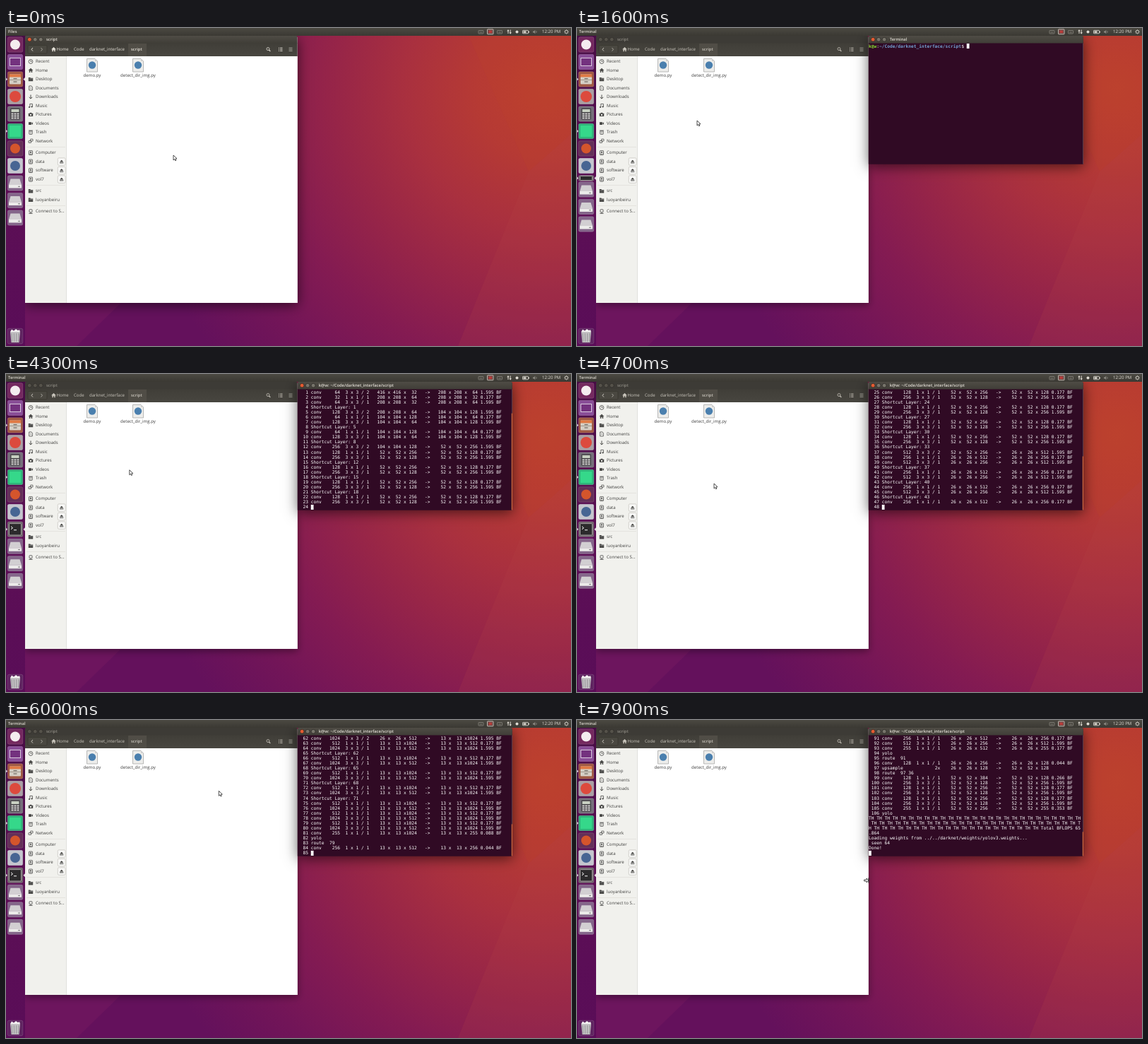
An HTML page with a canvas for the animation above (8000 ms loop, 800x450 px).

```html
<!DOCTYPE html>
<html lang="en">
<head>
<meta charset="utf-8">
<title>Desktop session</title>
<style>
html, body { margin: 0; width: 100%; height: 100%; overflow: hidden; background: #8b1b55; }
canvas { display: block; width: 100vw; height: 100vh; }
</style>
</head>
<body>
<canvas id="stage" width="800" height="450"></canvas>
<script>
const ctx = document.getElementById('stage').getContext('2d');
ctx.textRendering = 'geometricPrecision';

const LOOP = 8000, STEP = 100;
const UI = '"Open Sans", "Noto Sans", sans-serif';
const MONO = '"DejaVu Sans Mono", monospace';
const CELL_W = 3.75, CELL_H = 17 / 2.4, COLS = 80, ROWS = 24;
const TERM = { x: 413, y: 22 };
const CWD = '~/Code/darknet_interface/script';
const USER = 'k@w';
const PROMPT = USER + ':' + CWD + '$ ';
const EXPORT = 'export LD_LIBRARY_PATH=../lib:$LD_LIBRARY_PATH';
const RUN = 'python demo.py webcam ../../darknet/cfg/yolov3.cfg ../../darknet/weights/yolov3.weights 0.5 1';

// ---------- drawing helpers ----------
function rect(x, y, w, h, fill) {
  ctx.fillStyle = fill;
  ctx.fillRect(x, y, w, h);
}
function round(x, y, w, h, r, fill, stroke) {
  ctx.beginPath();
  ctx.roundRect(x, y, w, h, r);
  paint(fill, stroke);
}
function circle(x, y, r, fill, stroke) {
  ctx.beginPath();
  ctx.arc(x, y, r, 0, 7);
  paint(fill, stroke);
}
function trace(pts) {
  ctx.beginPath();
  for (let i = 0; i < pts.length; i += 2) ctx.lineTo(pts[i], pts[i + 1]);
}
function poly(pts, fill, stroke) {
  trace(pts);
  ctx.closePath();
  paint(fill, stroke);
}
function line(pts, color, width = 0.8) {
  trace(pts);
  ctx.lineWidth = width;
  ctx.strokeStyle = color;
  ctx.stroke();
}
function paint(fill, stroke) {
  if (fill) { ctx.fillStyle = fill; ctx.fill(); }
  if (stroke) { ctx.lineWidth = 0.8; ctx.strokeStyle = stroke; ctx.stroke(); }
}
function text(s, x, y, color, bold = false, align = 'left') {
  ctx.font = (bold ? '600 5.8px ' : '6.1px ') + UI;
  ctx.textAlign = align;
  ctx.textBaseline = 'middle';
  ctx.fillStyle = color;
  ctx.fillText(s, x, y);
}
function stops(g, colors) {
  colors.forEach((c, i) => g.addColorStop(i / (colors.length - 1), c));
  return g;
}
const fade = (x0, y0, x1, y1, ...colors) => stops(ctx.createLinearGradient(x0, y0, x1, y1), colors);
const glow = (x, y, r, ...colors) => stops(ctx.createRadialGradient(x, y, 0, x, y, r), colors);

function shadowed(blur, alpha, draw) {
  ctx.save();
  ctx.shadowColor = `rgba(0,0,0,${alpha})`;
  ctx.shadowBlur = blur;
  ctx.shadowOffsetY = 3;
  draw();
  ctx.restore();
}
// Linear interpolation through [time, ...values] keys
function track(keys, t) {
  if (t <= keys[0][0]) return keys[0].slice(1);
  for (let i = 1; i < keys.length; i++) {
    const [a, b] = [keys[i - 1], keys[i]];
    if (t <= b[0]) {
      const k = (t - a[0]) / (b[0] - a[0]);
      return a.slice(1).map((v, j) => v + (b[j + 1] - v) * k);
    }
  }
  return keys[keys.length - 1].slice(1);
}

// ---------- network listing ----------
function buildLayers() {
  const out = [], shapes = [];
  let w = 416, c = 3;
  const pad = (v, n) => String(v).padStart(n);
  const dims = (s, ch) => `${pad(s, 4)} x${pad(s, 4)} x${pad(ch, 4)}`;
  const add = s => { out.push(pad(out.length, 4) + ' ' + s); shapes.push([w, c]); };
  const conv = (n, size, stride = 1) => {
    const o = w / stride;
    const bf = (2 * n * size * size * c * o * o / 1e9).toFixed(3);
    const s = `conv  ${pad(n, 5)} ${pad(size, 2)} x${pad(size, 2)} /${pad(stride, 2)}  ${dims(w, c)}   ->  ${dims(o, n)} ${bf} BF`;
    w = o; c = n;
    add(s);
  };
  const route = (...ids) => {
    w = shapes[ids[0]][0];
    c = ids.reduce((sum, i) => sum + shapes[i][1], 0);
    add('route  ' + ids.join(' '));
  };
  const head = n => {
    for (let i = 0; i < 3; i++) { conv(n, 1); conv(2 * n, 3); }
    conv(255, 1);
    add('yolo');
  };
  const upsample = () => {
    const s = `upsample            2x  ${dims(w, c)}   ->  ${dims(2 * w, c)}`;
    w *= 2;
    add(s);
  };

  conv(32, 3);
  [1, 2, 8, 8, 4].forEach((repeat, i) => {
    const n = 64 << i;
    conv(n, 3, 2);
    for (let k = 0; k < repeat; k++) {
      conv(n / 2, 1);
      conv(n, 3);
      add('Shortcut Layer: ' + (out.length - 3));
    }
  });
  head(512);
  route(79); conv(256, 1); upsample(); route(85, 61);
  head(256);
  route(91); conv(128, 1); upsample(); route(97, 36);
  head(128);
  return out;
}
const LAYERS = buildLayers();

const PROGRESS = [[3900, 0], [4700, 48], [5300, 66], [6600, 102], [6800, 107]];

function wrap(s) {
  const rows = [];
  for (let i = 0; i < s.length; i += COLS) rows.push(s.slice(i, i + COLS));
  return rows;
}
function typed(s, t, from, to) {
  return s.slice(0, Math.ceil(s.length * Math.min(1, Math.max(0, (t - from) / (to - from)))));
}
// Terminal rows at time t; the caret follows the last row
function screen(t) {
  const first = wrap(PROMPT + typed(EXPORT, t, 1800, 2600));
  if (t < 2700) return first;
  const rows = [...first, ...wrap(PROMPT + typed(RUN, t, 2700, 3200))];
  if (t < 3300) return rows;
  rows.push('layer     filters    size              input                output');
  const n = Math.floor(track(PROGRESS, t)[0] + 1e-6);
  rows.push(...LAYERS.slice(0, n));
  if (n < LAYERS.length) return [...rows, LAYERS[n].slice(0, 5)];
  rows.push(...wrap('TH '.repeat(75) + 'Total BFLOPS 65.864'));
  rows.push('Loading weights from ../../darknet/weights/yolov3.weights...');
  if (t >= 7300) rows.push(' seen 64', 'Done!');
  return [...rows, ''];
}

// ---------- desktop ----------
function wallpaper() {
  rect(0, 0, 800, 450, glow(765, 85, 600, '#bc402f', '#b63a34', '#a9303f', '#972548', '#841b52', '#721558', '#64115c'));
  poly([655, 11, 800, 11, 800, 150, 740, 203], 'rgba(190,66,42,.18)');
  poly([740, 203, 800, 150, 800, 450, 640, 450], 'rgba(180,72,72,.16)');
  poly([27, 380, 172, 380, 100, 450, 27, 450], 'rgba(150,40,104,.18)');
}

function panel(t) {
  rect(0, 0, 800, 11, fade(0, 0, 0, 11, '#4b4942', '#3b3933'));
  const ink = '#e0dcd3', dim = '#8b8880';
  const showMenu = t >= 1900 && t < 4000;
  ctx.save();
  ctx.beginPath();
  ctx.rect(0, 0, showMenu ? 27 : 100, 11);
  ctx.clip();
  text(t < 1600 ? 'Files' : 'Terminal', 3, 5.3, ink, true);
  ctx.restore();
  if (showMenu) {
    const items = { 30: 'Terminal', 59: 'File', 75: 'Edit', 91: 'View', 110: 'Search', 135: 'Terminal', 164: 'Help' };
    for (const x in items) text(items[x], +x, 5.3, ink);
  }
  for (const x of [669, 695.5]) {
    round(x, 3.5, 7, 4.5, 0.6, null, dim);
    line([x + 1.5, 6, x + 5.5, 6], dim);
  }
  round(681.5, 1.8, 8.5, 7, 0.6, '#6d4a47', '#d9d2ca');
  rect(683.5, 3.6, 4.5, 3.4, '#b93c3a');
  line([711, 8, 711, 3], ink, 1);
  poly([709.3, 4.5, 711, 2, 712.7, 4.5], ink);
  line([714.2, 2.5, 714.2, 7.5], ink, 1);
  poly([712.5, 6.3, 714.2, 8.8, 715.9, 6.3], ink);
  circle(723.5, 5.5, 2, ink);
  round(731.5, 3.4, 8, 4.4, 0.6, null, ink);
  rect(732.5, 4.4, 4, 2.4, ink);
  rect(740, 4.7, 1, 1.8, ink);
  poly([746, 4.4, 747.5, 4.4, 749.3, 2.8, 749.3, 8.2, 747.5, 6.6, 746, 6.6], dim);
  line([751, 4, 751, 7], dim);
  text('12:20 PM', 759, 5.3, ink);
  circle(793.5, 5.4, 2, null, ink);
  for (let a = 0; a < 8; a++) {
    const cx = Math.cos(a * Math.PI / 4), cy = Math.sin(a * Math.PI / 4);
    line([793.5 + cx * 2.2, 5.4 + cy * 2.2, 793.5 + cx * 3.2, 5.4 + cy * 3.2], ink);
  }
}

function tile(y, fill, h = 21.5) {
  round(2.3, y - h / 2, 21.5, h, 2, fill, 'rgba(255,255,255,.18)');
}
function drive(y) {
  tile(y, '#84668a');
  poly([6.5, y - 6, 19.5, y - 6, 22, y + 2.5, 4, y + 2.5], '#d2cfd2');
  rect(4, y + 2.5, 18, 4.5, '#ecebea');
  rect(17, y + 4.3, 3, 1, '#777');
}
function launcher(t) {
  rect(0, 11, 27, 439, fade(0, 11, 0, 450, '#480c45', '#5c0f55', '#5a0d58'));
  const y = i => 23.5 + i * 24.5;
  tile(y(0), '#74295f');
  circle(13, y(0), 7, '#f4ecef');
  tile(y(1), '#8a4f98');
  rect(5, y(1) - 6, 16, 12, '#d8c8dc');
  rect(6, y(1) - 5, 14, 10, '#74327f');
  tile(y(2), '#a05a43');
  round(5, y(2) - 7, 16, 14, 1, '#d6d0c6');
  rect(5, y(2) - 7, 16, 4, '#e07a45');
  line([5, y(2) + 1, 21, y(2) + 1], '#8f887e');
  rect(10.5, y(2) - 1.5, 5, 1.2, '#6d665e');
  rect(10.5, y(2) + 3, 5, 1.2, '#6d665e');
  tile(y(3), '#aaa0a4');
  circle(13, y(3), 8, '#dc4a3d');
  tile(y(4), '#75707a');
  round(6, y(4) - 8, 14, 16, 1, '#474549');
  rect(7.5, y(4) - 6.5, 11, 4, '#c8d0c2');
  for (let i = 0; i < 9; i++) rect(7.5 + i % 3 * 4, y(4) - 1 + (i / 3 | 0) * 3, 3, 2, '#d6d4d4');
  tile(y(5), '#2fb67a');
  rect(5, y(5) - 8, 16, 16, '#35d88a');
  tile(y(6), '#643058');
  circle(13, y(6), 7, '#d4552c');
  tile(y(7), '#c4c6ce');
  circle(13, y(7), 7, '#476593');

  const open = t >= 1600;
  const shift = !open ? 0 : t < 1700 ? 9 : 24.3;
  for (let i = 8; i < 11; i++) drive(y(i) + shift);
  const ty = t < 1700 ? 212.5 : 219.8;
  if (open) {
    const h = t < 1700 ? 8 : 21.5;
    tile(ty, '#6c6569', h);
    round(4.5, ty - h * 0.38, 17, h * 0.76, 1, '#2c2a2c', '#bab5b5');
    if (t >= 1700) {
      line([7, ty - 4, 9.5, ty - 2, 7, ty], '#fff', 1);
      line([11, ty + 1, 15, ty + 1], '#fff', 1);
    }
  }
  for (let k = 0; k < 3; k++) {
    const py = [y(2), y(5), ty][k];
    if (k < 2 || open) poly([0, py - 2, 2, py, 0, py + 2], '#e7dde5');
  }
  const active = open ? ty : y(2);
  poly([27, active - 2.5, 24.5, active, 27, active + 2.5], '#e7dde5');

  tile(436, '#5f2560');
  poly([6, 430, 20, 430, 18.5, 445, 7.5, 445], '#c4c2c4');
  for (let i = 0; i < 4; i++) line([8 + i * 3.3, 432, 8.7 + i * 2.9, 444], '#827e85', 0.7);
  poly([6, 430, 8, 426.5, 11, 428.5, 14, 426, 17, 428, 19, 427, 20, 430], '#f4f2f2');
}

// ---------- file manager ----------
const ICONS = {
  clock(x, y, c) { circle(x, y, 2.9, null, c); line([x, y - 1.8, x, y, x + 1.5, y], c); },
  home(x, y, c) { poly([x - 3.4, y, x, y - 3.2, x + 3.4, y, x + 2.2, y, x + 2.2, y + 3, x + 0.7, y + 3, x + 0.7, y + 1, x - 0.7, y + 1, x - 0.7, y + 3, x - 2.2, y + 3, x - 2.2, y], c); },
  folder(x, y, c) { poly([x - 3.2, y - 2.6, x - 0.6, y - 2.6, x, y - 1.7, x + 3.2, y - 1.7, x + 3.2, y + 2.7, x - 3.2, y + 2.7], c); line([x - 2.5, y - 0.6, x + 2.8, y - 0.6], '#aaa', 0.5); },
  doc(x, y, c) { poly([x - 2.3, y - 3, x + 1, y - 3, x + 2.3, y - 1.6, x + 2.3, y + 3, x - 2.3, y + 3], null, c); line([x - 1, y, x + 1, y], c, 0.6); },
  down(x, y, c) { line([x, y - 3, x, y + 2.5], c, 1); line([x - 2.3, y + 0.3, x, y + 2.6, x + 2.3, y + 0.3], c, 1); },
  note(x, y, c) { line([x - 1.2, y + 2, x - 1.2, y - 2.6, x + 2.4, y - 2.6, x + 2.4, y + 1.2], c); circle(x - 2, y + 2, 1.1, c); circle(x + 1.6, y + 1.4, 1.1, c); },
  camera(x, y, c) { round(x - 3.2, y - 1.8, 6.4, 4.4, 0.6, c); rect(x - 1.3, y - 2.7, 2.6, 1.2, c); circle(x, y + 0.4, 1.2, '#ecece8'); },
  video(x, y, c) { rect(x - 3, y - 1.8, 4, 3.8, c); poly([x + 1, y, x + 3, y - 1.8, x + 3, y + 2], c); },
  trash(x, y, c) { round(x - 2.2, y - 1.7, 4.4, 4.6, 0.5, null, c); line([x - 3, y - 2.4, x + 3, y - 2.4], c); line([x, y - 1, x, y + 2], c, 0.6); },
  net(x, y, c) { round(x - 3, y - 0.4, 3.6, 2.8, 0.3, null, c); round(x - 0.4, y - 2.8, 3.4, 2.8, 0.3, null, c); },
  disk(x, y, c) { round(x - 2.5, y - 3, 5, 6, 0.6, null, c); circle(x, y - 0.7, 1.1, c); line([x - 1.5, y + 1.7, x + 1.5, y + 1.7], c); },
  server(x, y, c) { round(x - 2, y - 3, 4, 4, 0.5, null, c); line([x - 2.6, y + 2.7, x + 2.6, y + 2.7], c); line([x, y + 1, x, y + 2.6], c); }
};
const PLACES = [
  'clock Recent', 'home Home', 'folder Desktop', 'doc Documents', 'down Downloads', 'note Music',
  'camera Pictures', 'video Videos', 'trash Trash', 'net Network', '',
  'disk Computer', 'disk data', 'disk software', 'disk vol7', '',
  'folder src', 'folder luoyanbeiru', '', 'server Connect to S...'
];

function titleBar(x, w, title, focused) {
  ctx.beginPath();
  ctx.roundRect(x, 11, w, 11, [2, 2, 0, 0]);
  paint(focused ? fade(0, 11, 0, 22, '#4f4c45', '#3f3d37') : '#3d3b36');
  for (let i = 0; i < 3; i++) {
    const fill = !focused ? '#55524a' : i ? '#77746a' : '#e55b32';
    circle(x + 6.3 + i * 8, 16.2, 2.9, fill, '#2f2d29');
  }
  text(title, x + 30, 16.2, focused ? '#e2ded5' : '#8d8a82', true);
}
function pyFile(x, name) {
  poly([x - 7.5, 43.5, x + 4, 43.5, x + 7.5, 47, x + 7.5, 62, x - 7.5, 62], '#ededeb', '#a9a9a7');
  poly([x + 4, 43.5, x + 4, 47, x + 7.5, 47], '#cfcfcd');
  circle(x, 52.5, 5.2, '#4a7fae');
  text(name, x, 67, '#3c3c3c', false, 'center');
}
function files(focused) {
  shadowed(focused ? 17 : 10, focused ? 0.6 : 0.4, () => rect(27, 13, 385.6, 376, '#fff'));
  titleBar(27, 385.6, 'script', focused);
  rect(27, 21.5, 385.6, 18.5, fade(0, 21, 0, 40, '#403e38', '#484640'));
  const ink = focused ? '#e4e0d7' : '#c9c5bc';
  round(31, 24.5, 27, 11.5, 1.5, '#4a4841', '#38362f');
  line([38, 28, 36, 30.3, 38, 32.6], ink, 1);
  line([49.5, 28, 51.5, 30.3, 49.5, 32.6], '#a9a69e', 1);
  rect(173, 22, 26, 18, '#504d46');
  ICONS.home(67.5, 30.3, ink);
  text('Home', 71.5, 30.5, ink);
  text('Code', 96, 30.5, ink);
  text('darknet_interface', 118, 30.5, ink);
  text('script', 177, 30.5, ink, true);
  circle(371, 29.6, 2, null, ink);
  line([372.4, 31, 374.3, 33], ink, 1.1);
  for (let i = 0; i < 3; i++) {
    const y = 28.2 + i * 2.1;
    rect(386, y - 0.5, 1, 1, ink);
    line([388, y, 391.5, y], ink, 0.9);
    line([400.5, y, 405.5, y], '#aaa79f', 0.9);
  }
  rect(27, 40, 58.5, 349, '#f1f1ed');
  rect(85, 40, 0.8, 349, '#d3d2cd');
  rect(85.8, 40, 326.8, 349, '#fff');

  let y = 47.5;
  for (const item of PLACES) {
    if (!item) {
      rect(29, y - 4.4, 55, 0.6, '#dcdbd6');
      y += 4.1;
      continue;
    }
    const cut = item.indexOf(' '), label = item.slice(cut + 1);
    ICONS[item.slice(0, cut)](35, y, '#4a4a48');
    text(label, 42, y, '#3f3f3d');
    if (['data', 'software', 'vol7'].includes(label)) {
      round(73.3, y - 5.2, 10.8, 10.4, 1.5, '#f8f8f6', '#c9c8c3');
      poly([76, y + 0.4, 78.7, y - 2.4, 81.4, y + 0.4], '#3f3f3d');
      rect(76, y + 1.3, 5.4, 1, '#3f3f3d');
    }
    y += 12.5;
  }
  pyFile(122, 'demo.py');
  pyFile(187, 'detect_dir_img.py');
}
function contextMenu() {
  shadowed(4, 0.4, () => rect(170.5, 131.8, 100.5, 74, '#f4f3f1'));
  ctx.lineWidth = 0.6;
  ctx.strokeStyle = '#bdbab5';
  ctx.strokeRect(170.5, 131.8, 100.5, 74);
  const items = { 139.5: 'New Folder', 152: 'New Document', 166.5: 'Open in Terminal', 182: 'Paste', 197.5: 'Properties' };
  for (const y in items) text(items[y], 178, +y, y === '182' ? '#a9a7a2' : '#3f3f3d');
  poly([264, 150, 266.5, 152, 264, 154], '#3f3f3d');
  for (const y of [174.5, 189.8]) rect(171, y, 99.5, 0.6, '#d6d4cf');
}

// ---------- terminal ----------
function run(s, col, row, color, bold) {
  ctx.font = (bold ? 'bold ' : '') + '6.23px ' + MONO;
  ctx.textAlign = 'left';
  ctx.textBaseline = 'alphabetic';
  ctx.fillStyle = color;
  for (const m of s.matchAll(/\S+/g))
    ctx.fillText(m[0], TERM.x + (col + m.index) * CELL_W, TERM.y + row * CELL_H + 5.5);
}
function terminal(t) {
  shadowed(18, 0.6, () => rect(413, 12, 303.6, 180.5, '#300a24'));
  titleBar(412.8, 304, t < 1700 ? 'Terminal' : USER + ': ' + CWD, true);
  rect(412.8, 21.5, 304, 171, '#300a24');
  rect(716, 21.5, 0.8, 171, '#5e4655');
  const all = screen(t);
  const rows = all.slice(-ROWS);
  if (all.length > ROWS) {
    const h = 171 * ROWS / all.length;
    rect(715.8, 192.5 - h, 1, h, '#e8743f');
  }
  rows.forEach((s, r) => {
    if (!s.startsWith(USER)) return run(s, 0, r, '#fff');
    const n = USER.length, end = n + 1 + CWD.length;
    run(USER, 0, r, '#8ae234', true);
    run(':', n, r, '#fff');
    run(CWD, n + 1, r, '#729fcf', true);
    run(s.slice(end), end, r, '#fff');
  });
  const caretOn = t < 3700 || Math.floor((t - 3700) / 600) % 2 === 1;
  if (caretOn) {
    const last = rows.length - 1;
    rect(TERM.x + rows[last].length * CELL_W, TERM.y + last * CELL_H, CELL_W, CELL_H, '#fff');
  }
}

// ---------- pointer ----------
const POINTER = [
  [700, 237, 180], [1100, 170, 131], [4200, 170, 131], [4700, 194, 155],
  [5300, 204, 146], [5700, 208, 145], [6600, 488, 11], [7500, 417, 219], [7700, 410, 227]
];
function pointer(t) {
  const [x, y] = track(POINTER, t);
  if (t >= 7600) {
    poly([x - 3.4, y - 1, x, y - 1, x, y - 3, x + 2.6, y, x, y + 3, x, y + 1, x - 3.4, y + 1], '#fff', '#222');
    line([x + 3, y - 3.4, x + 3, y + 3.4], '#222', 1.1);
  } else if (t >= 1600 && x > 413 && x < 716 && y > 22 && y < 192) {
    const bar = [x - 1.6, y - 4, x + 1.6, y - 4, x, y - 4, x, y + 4, x - 1.6, y + 4, x + 1.6, y + 4];
    line(bar, '#111', 2);
    line(bar, '#fff', 0.9);
  } else {
    poly([x, y, x, y + 7, x + 1.6, y + 5.5, x + 2.7, y + 7.8, x + 3.9, y + 7.2, x + 2.9, y + 5, x + 5, y + 4.8], '#fff', '#222');
  }
}

function draw(t) {
  wallpaper();
  files(t < 1600);
  if (t >= 1300 && t < 1400) contextMenu();
  if (t >= 1600) terminal(t);
  launcher(t);
  panel(t);
  pointer(t);
}

const start = performance.now();
let shown = -1;
function tick() {
  const t = Math.floor((performance.now() - start) % LOOP / STEP) * STEP;
  if (t !== shown) draw(shown = t);
  requestAnimationFrame(tick);
}
tick();
</script>
</body>
</html>
```
